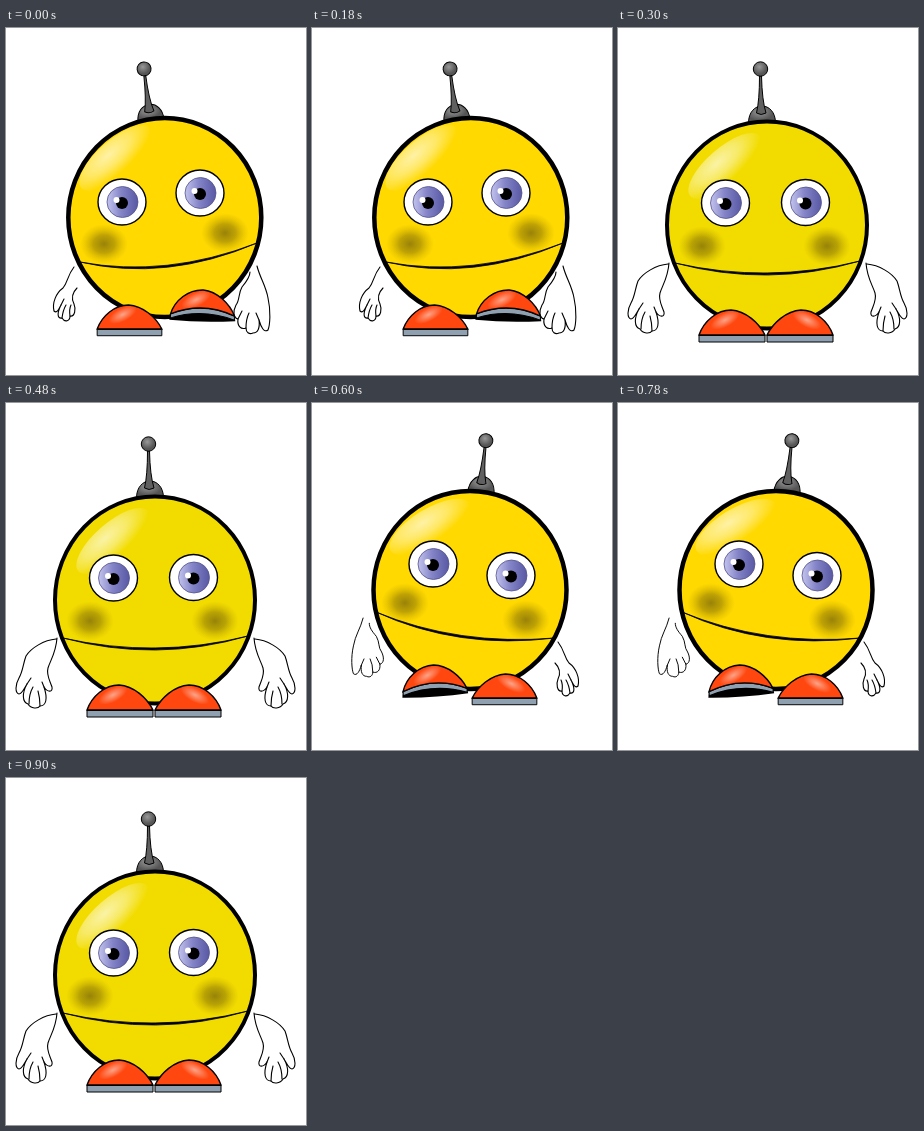
Recreate the animation shown at these times as an HTML page. Size 300 px wide and 347 px high, loop 1.2 s.

```html
<!DOCTYPE html>
<html lang="en">
<head>
<meta charset="utf-8">
<title>Swaying robot</title>
<style>
  html, body { margin: 0; width: 100%; height: 100%; overflow: hidden; background: #fff; }
  svg { display: block; width: 100vw; height: 100vh; }
  .pose { visibility: hidden; animation: 1.2s step-end infinite; }
  .left { animation-name: left; }
  .front { animation-name: front; }
  .right { animation-name: right; }
  @keyframes left { 0% { visibility: visible; } 25%, 100% { visibility: hidden; } }
  @keyframes front {
    0%, 50% { visibility: hidden; }
    25%, 75% { visibility: visible; }
    100% { visibility: hidden; }
  }
  @keyframes right { 0%, 75%, 100% { visibility: hidden; } 50% { visibility: visible; } }
  .hand { fill: #fff; stroke: #000; stroke-width: 1.1; stroke-linecap: round; stroke-linejoin: round; }
</style>
</head>
<body>
<svg id="stage" viewBox="0 0 300 347">
  <defs>
    <radialGradient id="blush">
      <stop offset="0" stop-color="#806c0a" stop-opacity=".8"/>
      <stop offset=".45" stop-color="#8a7508" stop-opacity=".55"/>
      <stop offset="1" stop-color="#c0a400" stop-opacity="0"/>
    </radialGradient>
    <radialGradient id="shine" cx=".45" cy=".3" r=".6">
      <stop offset="0" stop-color="#fff" stop-opacity=".65"/>
      <stop offset=".5" stop-color="#fff" stop-opacity=".4"/>
      <stop offset="1" stop-color="#fff" stop-opacity="0"/>
    </radialGradient>
    <linearGradient id="iris">
      <stop offset="0" stop-color="#c4c4ee"/>
      <stop offset=".45" stop-color="#8484c8"/>
      <stop offset="1" stop-color="#5858a4"/>
    </linearGradient>
    <radialGradient id="metal" cx=".42" cy=".35">
      <stop offset="0" stop-color="#999"/>
      <stop offset="1" stop-color="#555"/>
    </radialGradient>
    <radialGradient id="gloss">
      <stop offset="0" stop-color="#fff" stop-opacity=".5"/>
      <stop offset="1" stop-color="#fff" stop-opacity="0"/>
    </radialGradient>

    <g id="antenna" stroke="#000">
      <path d="M-13.500 5C-13.500-6-7-12 0-12S13.500-6 13.500 5Z" fill="url(#metal)"/>
      <path d="M-2.500-42Q-2.500-18-5.500-5Q-1-2 4-5Q0-18-.5-42Z" fill="#606060"/>
      <circle cx="-1.500" cy="-49" r="7.200" fill="url(#metal)"/>
    </g>

    <g id="eye">
      <ellipse rx="24" ry="23" fill="#fff" stroke="#000" stroke-width="1.400"/>
      <circle cx=".5" r="15.500" fill="url(#iris)" stroke="#55558c" stroke-width=".8"/>
      <circle cy="1" r="6"/>
      <circle cx="-5.500" cy="-2" r="3" fill="#fff"/>
    </g>

    <ellipse id="glow" cx="-7" cy="-15" rx="16" ry="7" fill="url(#gloss)" transform="rotate(-28 -7 -15)"/>
    <g id="foot" stroke="#000">
      <path d="M-33 0C-28-14-15-25-1-25C14-24 27-12 33 0Z" fill="#ff470f" stroke-width="1.400"/>
      <path d="M-33 .5H33V7H-33Z" fill="#8fa1b0"/>
      <use href="#glow" stroke="none"/>
    </g>
    <g id="raised">
      <path d="M-32 0Q0-14 32 0L33 5Q0 8-33 6Z"/>
      <path d="M-32 0Q0-14 32 0V4Q0-7-32 4Z" fill="#8fa1b0" stroke="#000"/>
      <path d="M-32 0C-28-14-15-25 0-25C14-24 27-12 32 0Q0-14-32 0Z" fill="#ff470f" stroke="#000" stroke-width="1.400"/>
      <use href="#glow"/>
    </g>

    <g id="open" class="hand">
      <path d="M50 236C38 237 25 245 20 253C17 261 17 268 13 275C9 282 9 290 13 291C16 291 18 286 21 281C16 290 16 299 22 301C25 306 32 306 34 303C40 303 42 296 38 284C42 290 47 289 46 284C44 278 40 272 42 265C44 258 50 250 51 235"/>
      <path d="M21 281L25 275M23 301Q23 291 27 284M34 303Q34 295 32 288M38 284L36 279" fill="none"/>
    </g>
    <g id="slim" class="hand">
      <path d="M68 239C61 248 62 254 57 260C50 265 46 275 48 283C51 286 53 281 55 277C51 285 51 291 56 290C59 295 64 293 64 288C69 289 70 281 68 276C65 270 66 265 71 260"/>
      <path d="M55 277L58 271M56 290Q57 282 60 277M64 288Q63 281 65 277" fill="none"/>
    </g>
    <g id="wide" class="hand">
      <path d="M251 238C254 250 260 258 262 270C265 283 264 297 262 302C258 305 255 299 253 292C254 300 252 305 247 305C243 307 240 304 240 300C235 302 231 298 232 291C227 290 227 283 230 277C234 272 232 266 236 259C241 253 244 249 244 244"/>
      <path d="M232 291L236 283M240 300Q240 291 243 285M253 292L250 285" fill="none"/>
    </g>
  </defs>
</svg>
<script>
  const use = (id, x, y, extra = "") =>
    `<use href="#${id}" transform="translate(${x} ${y}) ${extra}"/>`;
  const flip = "scale(-1 1)";

  const poses = [
    {
      name: "left", skin: "#ffd900", body: [158.8, 189.5, 96.5, 99.5], line: 4.5,
      antenna: [144.5, 88, "rotate(-6) scale(.97)"],
      eyes: [[116, 174], [194, 165]],
      cheeks: [[98, 216], [219, 205]], shine: [110, 130, -41],
      mouth: [74, 234, 160, 252, 251, 215],
      hands: [["slim", 0, 0], ["wide", 0, 0]],
      feet: [["foot", 123.5, 301, "scale(.98 .96)"], ["raised", 196.5, 287, "rotate(2)"]]
    },
    {
      name: "front", skin: "#f2dc00", body: [149, 197, 100, 103.5], line: 4,
      antenna: [144, 90, ""],
      eyes: [[107.5, 175], [187.5, 174.5]],
      cheeks: [[84, 218], [209, 218]], shine: [107, 138, -41],
      mouth: [57, 235, 150, 258, 242, 233],
      hands: [["open", 0, 0], ["open", 299, 0, flip]],
      feet: [["foot", 114, 307], ["foot", 182, 307, flip]]
    },
    {
      name: "right", skin: "#ffd900", body: [158, 187, 96.5, 99], line: 4.5,
      antenna: [169.5, 85, "rotate(7) scale(.97)"],
      eyes: [[121, 161], [199, 172.500]],
      cheeks: [[93, 200], [214, 217]], shine: [118, 124, -31],
      mouth: [64, 209, 146, 245, 243, 235],
      hands: [["wide", 272, 8, "scale(-.88 .87)"], ["slim", 314, 0, flip]],
      feet: [["raised", 123, 287, "rotate(-3)"], ["foot", 192.5, 295, "scale(-.98 .96)"]]
    }
  ];

  function draw(p) {
    const [cx, cy, rx, ry] = p.body;
    const [x1, y1, mx, my, x2, y2] = p.mouth;
    const [sx, sy, tilt] = p.shine;
    const all = list => list.map(a => use(...a)).join("");
    const cheeks = p.cheeks.map(([x, y]) =>
      `<ellipse cx="${x}" cy="${y}" rx="24" ry="20" fill="url(#blush)"/>`).join("");
    return `<g class="pose ${p.name}">
      ${use("antenna", ...p.antenna)}
      <ellipse cx="${cx}" cy="${cy}" rx="${rx}" ry="${ry}" fill="${p.skin}" stroke="#000" stroke-width="${p.line}"/>
      <ellipse rx="46" ry="18" fill="url(#shine)" transform="translate(${sx} ${sy}) rotate(${tilt})"/>
      ${cheeks}
      <path d="M${x1} ${y1}Q${mx} ${my + 2} ${x2} ${y2}Q${mx} ${my - 2} ${x1} ${y1}Z" stroke="#000" stroke-width=".8"/>
      ${all(p.eyes.map(e => ["eye", ...e]))}
      ${all(p.hands)}${all(p.feet)}
    </g>`;
  }

  document.getElementById("stage").insertAdjacentHTML("beforeend", poses.map(draw).join(""));
</script>
</body>
</html>
```
